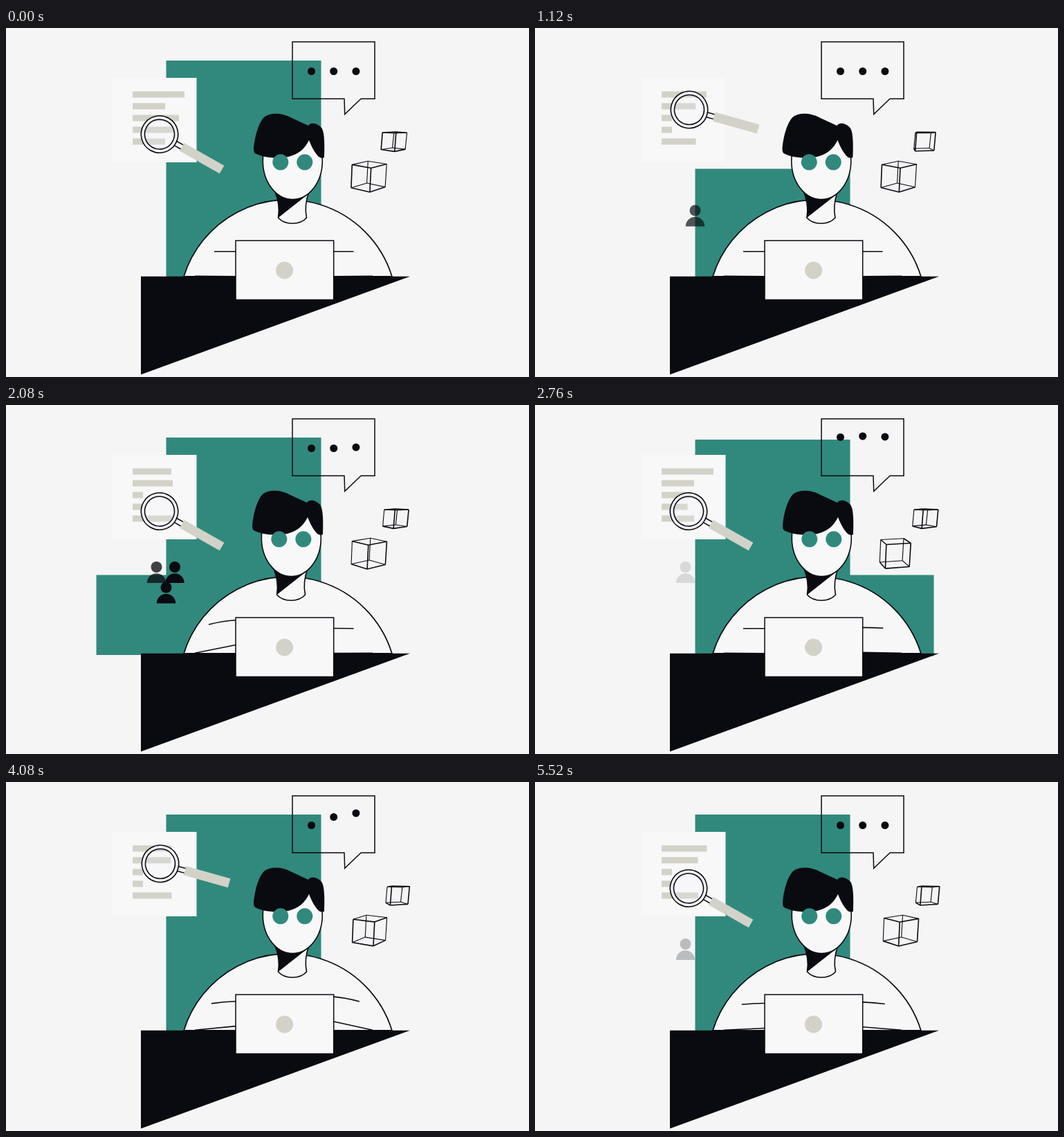
An HTML page with a canvas for the animation above (5.56 s loop, 756 px wide and 504 px high).

```html
<!DOCTYPE html>
<html lang="en">
<head>
<meta charset="utf-8">
<title>Desk research</title>
<style>
html, body { margin: 0; width: 100%; height: 100%; overflow: hidden; background: #f5f5f5; }
canvas { display: block; }
</style>
</head>
<body>
<canvas id="stage" width="756" height="504"></canvas>
<script>
const g = document.getElementById('stage').getContext('2d');
const LOOP = 5560, TAU = Math.PI * 2;
const INK = '#0a0b10', GREEN = '#31897d', PAPER = '#f8f8f8', SAND = '#d2d2c8';

const mix = (a, b, u) => a + (b - a) * u;
const ease = u => u < 0.5 ? 2 * u * u : 1 - 2 * (1 - u) * (1 - u);
const ramp = (t, from, span) => Math.max(0, Math.min(1, (t - from) / span));
// 0 to 1 from `up`, back to 0 from `down`
const pulse = (t, up, rise, down, fall) => ramp(t, up, rise) - ramp(t, down, fall);
const softPulse = (t, up, rise, down, fall) => ease(ramp(t, up, rise)) - ease(ramp(t, down, fall));

function box(x, y, w, h, color) {
  g.fillStyle = color;
  g.fillRect(x, y, w, h);
}

function disc(x, y, r, color) {
  g.fillStyle = color;
  g.beginPath();
  g.arc(x, y, r, 0, TAU);
  g.fill();
}

function fill(color) {
  g.fillStyle = color;
  g.fill();
}

function outline(width = 1.6) {
  g.strokeStyle = INK;
  g.lineWidth = width;
  g.stroke();
}

function drawPanels(t) {
  const drop = 199 * (pulse(t, 680, 160, 1060, 280) + pulse(t, 2757, 200, 3200, 300));
  const right = 131 * (pulse(t, 560, 140, 860, 180) + pulse(t, 2580, 194, 3040, 160));
  const left = 111 * (pulse(t, 1760, 200, 2055, 290) + pulse(t, 4160, 280, 4520, 240));
  box(231.5, 47 + drop, 224, 313 - drop, GREEN);
  if (right > 0) box(455, 245.5, right, 117, GREEN);
  if (left > 0) box(232 - left, 245.5, left, 115.5, GREEN);
}

// Each line of text: full width, other width, start and length of the change
const LINES = [
  [75, 56, 960, 300],
  [47, 58, 1060, 280],
  [67, 15, 80, 440],
  [60, 15, 80, 440],
  [47, 59, 1060, 280]
];

function drawPage(t) {
  box(153.5, 72, 122, 122, PAPER);
  LINES.forEach(([a, b, from, span], i) => {
    const back = from < 900 ? 2720 : 2680;
    box(183, 91.5 + 17 * i, mix(a, b, pulse(t % 2800, from, span, back, 80)), 9, SAND);
  });
}

function drawLens(t) {
  const u = softPulse(t % 3360, 160, 480, 1120, 480);
  g.save();
  g.translate(222 + u, 153.5 - 35.5 * u);
  g.rotate((29.5 - 13.8 * u) * Math.PI / 180);
  box(26, -3.5, 12, 7, '#f3f3f6');
  g.beginPath();
  for (const y of [-3.5, 3.5]) {
    g.moveTo(26, y);
    g.lineTo(38, y);
  }
  outline(1.5);
  box(37, -6.7, 66.5, 13.4, SAND);
  g.beginPath();
  g.arc(0, 0, 27, 0, TAU);
  g.arc(0, 0, 21.5, 0, TAU);
  g.fillStyle = '#f3f3f7';
  g.fill('evenodd');
  disc(0, 0, 21.5, 'rgba(240,240,247,.2)');
  for (const r of [26.7, 21.5]) {
    g.beginPath();
    g.arc(0, 0, r, 0, TAU);
    outline();
  }
  g.restore();
}

function drawPeople(t) {
  [[217.5, 234], [244, 234], [231.5, 263.5]].forEach(([x, y], i) => {
    g.globalAlpha = pulse(t % 1360, 190 * i, 330, 660 + 190 * i, 260);
    disc(x, y, 8, INK);
    g.beginPath();
    g.arc(x, y + 23, 13.7, Math.PI, 0);
    g.fill();
  });
  g.globalAlpha = 1;
}

function drawBubble(t) {
  g.beginPath();
  g.moveTo(489, 102.3);
  g.lineTo(414, 102.3);
  g.lineTo(414, 20);
  g.lineTo(533, 20);
  g.lineTo(533, 102.3);
  g.lineTo(513, 102.3);
  g.lineTo(489.7, 124.5);
  g.closePath();
  outline(1.5);
  for (let i = 0; i < 3; i++) {
    const lift = softPulse(t % 1120 - 160 * i, 0, 240, 480, 200);
    disc(441.5 + 32.2 * i, 62.5 - 17.5 * lift, 5.5, INK);
  }
}

function drawCube(x, y, half, yaw, tilt, depth, lean) {
  const turn = (135 - yaw) * Math.PI / 180;
  const corner = (k, side) => {
    const a = turn + k * Math.PI / 2;
    const px = half * Math.SQRT2 * Math.cos(a);
    const pz = half * Math.SQRT2 * Math.sin(a);
    const py = side * half * 0.97;
    const z = pz * Math.cos(tilt) - py * Math.sin(tilt);
    const scale = 1 / (1 - z * depth);
    return [
      x + px * scale - py * lean,
      y + (py * Math.cos(tilt) + pz * Math.sin(tilt)) * scale,
      z
    ];
  };
  const edge = (a, b) => {
    g.beginPath();
    g.moveTo(a[0], a[1]);
    g.lineTo(b[0], b[1]);
    outline(a[2] + b[2] > -2 ? 1.6 : 1.1);
  };
  for (let k = 0; k < 4; k++) {
    const top = corner(k, -1), bottom = corner(k, 1);
    edge(top, corner(k + 1, -1));
    edge(bottom, corner(k + 1, 1));
    edge(top, bottom);
  }
}

function drawCubes(t) {
  const sway = 5 * Math.sin(t / 2080 * TAU);
  drawCube(524.5 - sway, 213.7, 17.6, 50 + 0.0743 * t + 3.94e-6 * t * t, 0.235, 0.002, 0.05);
  drawCube(561 + t / 1000, 163.3, 12.5, 50 + 0.125 * t, 0.05, 0.0082, 0.09);
}

function drawBody() {
  g.beginPath();
  g.arc(407.5, 405.5, 157.5, Math.PI + 0.3, -0.3);
  g.closePath();
  fill('#f7f7f7');
  outline(1.7);
}

function neckSide() {
  g.beginPath();
  g.moveTo(388, 234);
  g.bezierCurveTo(394, 248, 396, 260, 393.5, 274);
}

function drawHead(t) {
  g.save();
  g.translate(Math.cos(t / 1360 * TAU) - 1, 0);

  neckSide();
  g.bezierCurveTo(403, 285, 425, 285, 434.5, 274);
  g.bezierCurveTo(432, 262, 433, 250, 438, 236);
  fill('#f7f7f7');
  outline();
  neckSide();
  g.lineTo(438, 239);
  fill(INK);

  g.beginPath();
  g.ellipse(414.3, 192, 43, 55.5, 0, 0, TAU);
  fill(PAPER);
  outline();

  // Hair
  g.beginPath();
  g.moveTo(358, 175);
  g.bezierCurveTo(359, 160, 364, 139, 372, 130);
  g.bezierCurveTo(381, 121, 400, 123, 411, 129);
  g.lineTo(437, 141);
  g.bezierCurveTo(441, 135, 451, 138, 456, 144);
  g.bezierCurveTo(460, 149, 461, 165, 460, 187);
  g.quadraticCurveTo(456, 189, 452, 186);
  g.bezierCurveTo(446, 180, 441, 170, 438, 162);
  g.bezierCurveTo(432, 174, 424, 182, 408, 186);
  g.bezierCurveTo(390, 190, 369, 186, 360, 181);
  g.quadraticCurveTo(358, 179, 358, 175);
  fill(INK);

  disc(396.8, 193.8, 11.5, GREEN);
  disc(431.8, 193.8, 11.5, GREEN);
  g.restore();
}

function drawArms(t) {
  const p = t % 1120;
  const l = pulse(p, 520, 400, 960, 110);
  const r = Math.sin(Math.PI * p / 470) ** 2;
  g.beginPath();
  g.moveTo(301 - 8 * l, 322.8 - 5.8 * l);
  g.quadraticCurveTo(317 - 3 * l, 322.8 - 11 * l, 332, 322.8 - 12 * l);
  g.moveTo(502.5 + 8.5 * r, 322.8 - 5.8 * r);
  g.quadraticCurveTo(488 + 2 * r, 322.8 - 11.5 * r, 474, 322.8 - 12.8 * r);
  g.moveTo(273, 358.3);
  g.lineTo(332, 358.8 - 12.3 * l);
  g.moveTo(474, 358.8 - 13 * r);
  g.lineTo(530, 358.3);
  outline();
}

function drawDesk() {
  g.beginPath();
  g.moveTo(195, 358.8);
  g.lineTo(584, 358.8);
  g.lineTo(195, 500.5);
  fill(INK);
}

function drawLaptop() {
  g.beginPath();
  g.rect(332, 307, 141.7, 85.4);
  fill(PAPER);
  outline(1.5);
  disc(402.6, 350, 12.5, SAND);
}

function draw(t) {
  box(0, 0, 756, 504, '#f5f5f5');
  drawPanels(t);
  drawPage(t);
  drawLens(t);
  drawPeople(t);
  drawBubble(t);
  drawCubes(t);
  drawBody();
  drawHead(t);
  drawDesk();
  drawArms(t);
  drawLaptop();
}

const start = performance.now();
function tick() {
  const t = (performance.now() - start) % LOOP;
  draw(Math.floor(t / 40) * 40);
  requestAnimationFrame(tick);
}
tick();
</script>
</body>
</html>
```
